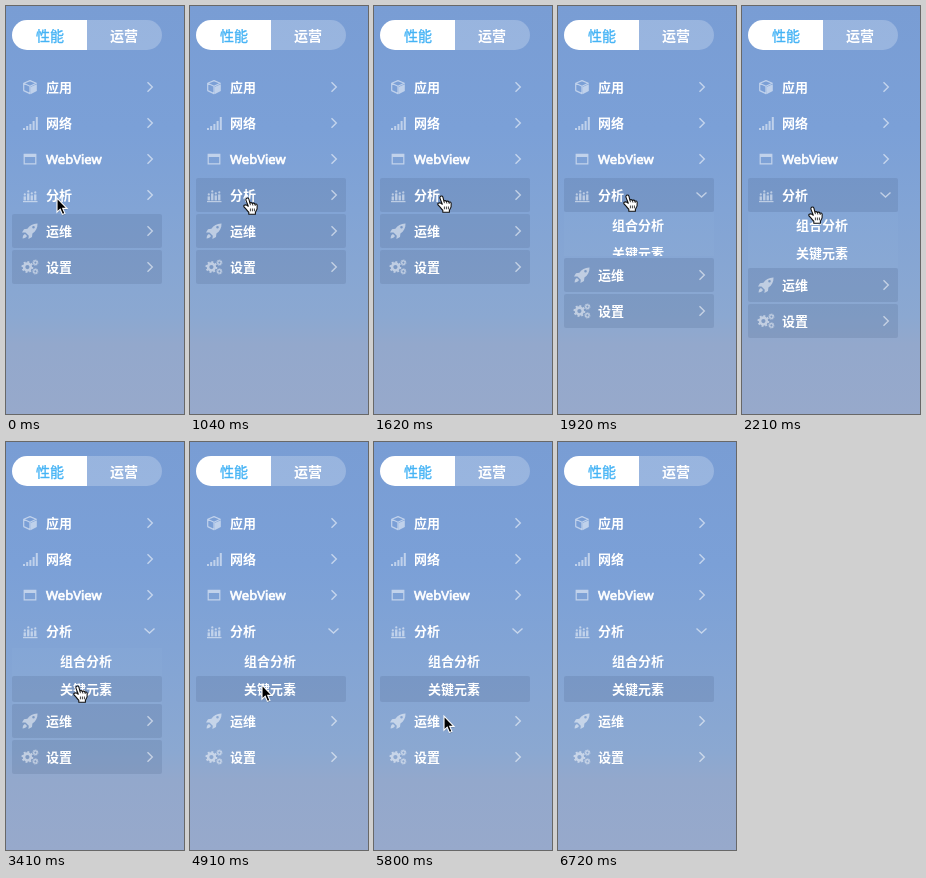
Write an HTML page that moves like this. It is 178 px wide and 408 px high and loops after 7.32 s.

```html
<!DOCTYPE html>
<html lang="zh-CN">
<head>
<meta charset="utf-8">
<title>Side menu</title>
<style>
  html, body { margin: 0; width: 100%; height: 100%; overflow: hidden; background: #93a8cc; }
  svg { display: block; width: 178px; height: 408px; }
  text { font: 700 13px "Noto Sans", "Noto Sans CJK SC", "Noto Sans CJK", sans-serif; fill: #fff; }
  .latin { font-weight: 400; stroke: #fff; stroke-width: .7px; }
  .tab { font-size: 14px; }
  .active { font-weight: 400; fill: #45b3f5; stroke: #45b3f5; stroke-width: .35px; }
  .shade { fill: rgba(70, 90, 130, .18); }
  .icon { fill: #fff; stroke: #fff; stroke-width: 0; opacity: .52; }
  .line { fill: none; stroke-width: 1.2; }
  .chevron { fill: none; stroke: #fff; stroke-width: 1.4; opacity: .55; }
</style>
</head>
<body>
<svg viewBox="0 0 178 408">
  <defs>
    <linearGradient id="sky" x1="0" y1="0" x2="0" y2="1">
      <stop offset="0" stop-color="#799dd4"/>
      <stop offset=".3" stop-color="#7ba0d7"/>
      <stop offset=".5" stop-color="#82a4d5"/>
      <stop offset=".76" stop-color="#8ba8d1"/>
      <stop offset=".83" stop-color="#93a8cc"/>
      <stop offset="1" stop-color="#97a9cb"/>
    </linearGradient>
    <clipPath id="drop"><rect id="dropArea" x="6" y="206" width="150" height="0"/></clipPath>
  </defs>
  <rect width="178" height="408" fill="url(#sky)"/>
  <path d="M81 14H21a15 15 0 0 0 0 30h60z" fill="#fff"/>
  <path d="M81 14h60a15 15 0 0 1 0 30H81z" fill="#fff" opacity=".23"/>
  <text class="tab active" x="30" y="34.5">性能</text>
  <text class="tab" x="104" y="34.5">运营</text>
  <g id="menu"></g>
  <g id="sub" clip-path="url(#drop)">
    <rect id="subTint" x="6" y="206" width="150" height="56" fill="#fff" opacity=".02"/>
    <rect id="sub0" class="shade" x="6" y="206" width="150" height="26" rx="2"/>
    <rect id="sub1" class="shade" x="6" y="234" width="150" height="26" rx="2"/>
    <text x="54" y="223.5">组合分析</text>
    <text x="54" y="251.5">关键元素</text>
  </g>
  <g id="arrow">
    <path d="M1 1V15.2L4.2 12.2 6.4 17.4 8.9 16.4 6.7 11.4H11z" transform="translate(.4 1)" opacity=".25"/>
    <path d="M1 1V15.2L4.2 12.2 6.4 17.4 8.9 16.4 6.7 11.4H11z" stroke="#fff" stroke-width="1.1"/>
  </g>
  <g id="hand" fill="#fff" stroke="#111" stroke-width="1.1" stroke-linejoin="round">
    <path d="M4.4 1C3 1 2.6 2.5 3.1 3.6L5.3 9.3C4.3 8.2 2.4 7.5 1.2 8.3.3 9 .9 10 1.8 10.7 3.5 12 4 14 5.8 15.2V17.2H12.4V15.4C13.9 13.5 14.6 11 14.2 8.5 14 6.9 12.6 6.7 12 7.3 11.7 6 10 5.7 9.4 6.6 9 5.5 7.6 5.3 6.9 6L5.9 2.1C5.7 1.4 5.2 1 4.4 1z"/>
    <path d="M6.9 6l.6 2.2M9.4 6.6l.5 2M12 7.3l.3 1.7M7.4 11.5v2.8M9.4 11.5v2.8M11.4 11.5v2.8" fill="none" stroke-width=".8"/>
  </g>
</svg>
<script>
const LOOP = 7320;
const $ = id => document.getElementById(id);
const show = (node, on) => node.setAttribute("visibility", on ? "visible" : "hidden");
const move = (node, x, y) => node.setAttribute("transform", `translate(${x} ${y})`);

const bar = (x, bottom, w, h) => `<rect x="${x}" y="${bottom - h}" width="${w}" height="${h}"/>`;
const dot = (x, y) => `<circle cx="${x}" cy="${y}" r="1.1"/>`;
const gear = (x, y, r, teeth) =>
  `<circle class="line" cx="${x}" cy="${y}" r="${r}" style="stroke-width:${r * .75}"/>` +
  `<circle class="line" cx="${x}" cy="${y}" r="${r * 1.45}" pathLength="16" stroke-dasharray="1 1" style="stroke-width:${teeth}"/>`;

// Icons are centred on the origin.
const icons = {
  cube: `<path d="M.5.1L6.8-2.8V4L.5 7.2z"/>
    <path class="line" stroke-linejoin="round" d="M0-6.4L6.3-3.8 0-.8-6.3-3.8zM-6.3-3.8V3.6L0 6.6V-.8"/>`,
  signal: [2, 4, 6, 9, 13].map((h, i) => bar(-7 + i * 3.2, 7, 2, h)).join(""),
  window: `<path class="line" d="M-5.8-4.6H5.8V4.8H-5.8z"/><path d="M-6-5H6v3H-6z"/>`,
  chart: [4, 7, 5, 6].map((h, i) => bar(-6.4 + i * 3.5, 5.4, 2.3, h) + dot(-5.2 + i * 3.5, 3.4 - h)).join("") +
    bar(-7, 7.2, 14.5, 1.2),
  rocket: `<path fill-rule="evenodd" d="M7.5-7.5C3-7.6-.3-5.5-2.6-2.2L-6-1.8-8 1.6-4.5 1.5-1.2 4.8-1.6 8 2 6 2.4 2.6C5.8.2 7.7-3 7.5-7.5zM3.5-5a1.3 1.3 0 1 1 0 2.6 1.3 1.3 0 0 1 0-2.6z"/>
    <path d="M-5 3C-7 3.8-7.2 5.5-7.4 7.4-5.4 7.3-3.8 6.8-3 5z"/>`,
  gears: gear(-2.6, 0, 3.4, 1.9) + gear(5.4, -4.4, 1.7, 1.2) + gear(5.4, 4.4, 1.7, 1.2)
};

const items = [["应用", "cube"], ["网络", "signal"], ["WebView", "window"],
               ["分析", "chart"], ["运维", "rocket"], ["设置", "gears"]];
$("menu").innerHTML = items.map(([label, icon]) => `<g>
  <rect class="shade" x="6" y="-17" width="150" height="34" rx="2"/>
  <g class="icon" transform="translate(24 0)">${icons[icon]}</g>
  <text class="${/^\w/.test(label) ? "latin" : ""}" x="40" y="5">${label}</text>
  <path class="chevron"/></g>`).join("");
const rows = [...$("menu").children];
const shades = rows.map(row => row.querySelector(".shade"));
const chevrons = rows.map(row => row.querySelector(".chevron"));

// time, x, y, pointer
const pointer = [
  [0, 50, 191, "arrow"], [440, 48, 192, "arrow"], [740, 45, 192, "hand"],
  [1040, 53, 191, "hand"], [1180, 55, 191, "hand"], [1330, 58, 190, "hand"],
  [1480, 61, 190, "hand"], [1620, 63, 189, "hand"], [1770, 65, 188, "hand"],
  [1920, 65, 188, "hand"], [2060, 65, 190, "hand"], [2210, 66, 200, "hand"],
  [2360, 68, 214, "hand"], [2510, 69, 225, "hand"], [2960, 77, 231, "hand"],
  [3110, 86, 236, "hand"], [3260, 76, 241, "hand"], [3410, 67, 243, "hand"],
  [4910, 71, 242, "arrow"], [5510, 71, 252, "arrow"], [5660, 70, 264, "arrow"],
  [5800, 69, 273, "arrow"], [6280, 75, 300, "arrow"], [6430, 84, 337, "arrow"],
  [6570, 91, 371, "arrow"], [6720, 0, 0, "none"]
];

// The picture advances in steps; the submenu slides open over 400 ms.
function dropHeight(t) {
  const p = Math.min(1, Math.max(0, (t - 1642) / 400));
  return Math.round(56 * (.5 - Math.cos(Math.PI * p) / 2));
}

function render(now) {
  const time = now % LOOP;
  const [t, x, y, kind] = pointer.findLast(step => step[0] <= time);
  const height = dropHeight(t);
  const shift = t >= 2210 ? 54 : height;

  rows.forEach((row, i) => move(row, 0, 81 + i * 36 + (i > 3 ? shift : 0)));
  shades.forEach((shade, i) => show(shade,
    i === 3 ? t >= 1040 && t < 2360 : i > 3 && t < 4910));
  chevrons.forEach((chevron, i) => chevron.setAttribute("d",
    i === 3 && height ? "M138.5-2.5L143.5 2 148.5-2.5" : "M141.5-4.8L146.3 0 141.5 4.8"));

  $("dropArea").setAttribute("height", height);
  show($("subTint"), t < 4910);
  show($("sub0"), t >= 2360 && t < 3110);
  show($("sub1"), t >= 3110);

  for (const id of ["arrow", "hand"]) {
    show($(id), id === kind);
    move($(id), x, y);
  }
}

const start = performance.now();
function frame() {
  render(performance.now() - start);
  requestAnimationFrame(frame);
}
frame();
</script>
</body>
</html>
```
